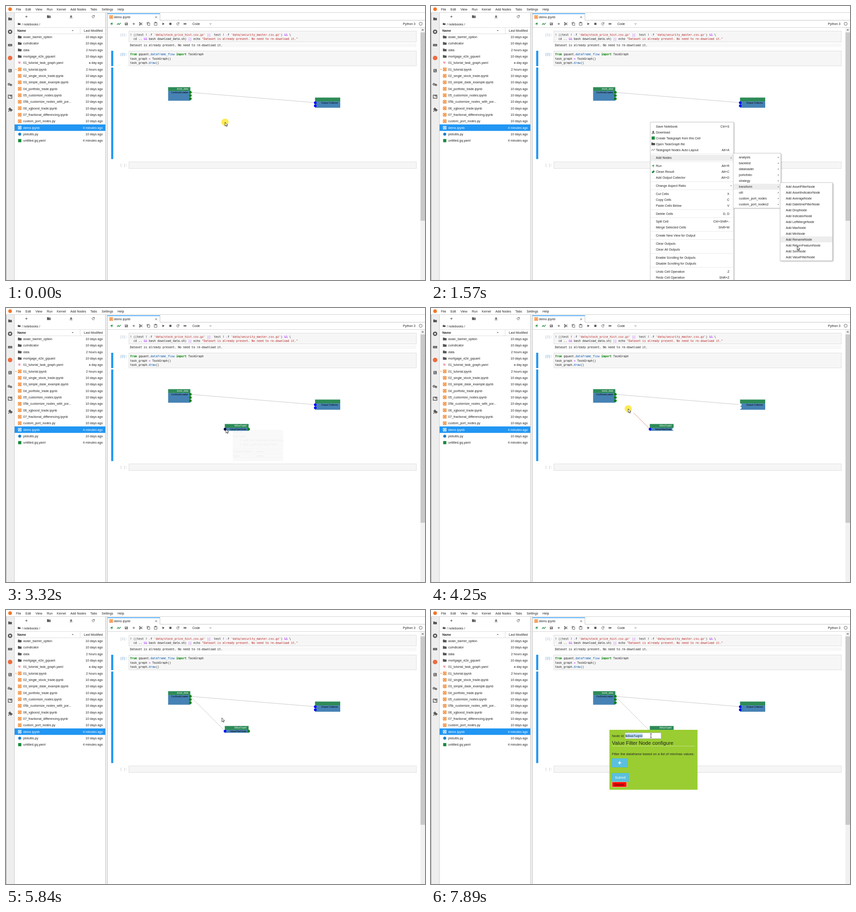
Write an HTML page with a canvas that moves like this. It is 924 by 606 pixels and loops after 8000 ms.

```html
<!DOCTYPE html>
<html lang="en">
<head>
<meta charset="utf-8">
<title>Notebook</title>
<style>
html, body { margin: 0; width: 100%; height: 100%; overflow: hidden; background: #fff; }
canvas { display: block; }
</style>
</head>
<body>
<canvas id="stage" width="924" height="606"></canvas>
<script>
const ctx = document.getElementById('stage').getContext('2d');
const LOOP = 8000;
const SANS = '"Liberation Sans", Arial, sans-serif';
const MONO = '"DejaVu Sans Mono", monospace';
const CHAR = 3.777;
const BLUE = '#2196f3', ORANGE = '#ef6c00', GREY = '#555', GREEN = '#1b8a3c';

// ---- drawing helpers ----
function text(str, x, y, { size = 7, color = '#222', align = 'left', font = SANS, bold = false } = {}) {
  ctx.save();
  ctx.translate(x, y + size * 0.36);
  ctx.scale(0.1, 0.1); // large font scaled down keeps fractional advances
  ctx.font = `${bold ? 'bold ' : ''}${size * 10}px ${font}`;
  ctx.textAlign = align;
  ctx.fillStyle = color;
  ctx.fillText(str, 0, 0);
  ctx.restore();
}

function box(x0, y0, x1, y1, fill, stroke) {
  if (fill) {
    ctx.fillStyle = fill;
    ctx.fillRect(x0, y0, x1 - x0, y1 - y0);
  }
  if (stroke) {
    ctx.strokeStyle = stroke;
    ctx.lineWidth = 0.8;
    ctx.strokeRect(x0, y0, x1 - x0, y1 - y0);
  }
}

function line(x0, y0, x1, y1, color, width = 1) {
  ctx.strokeStyle = color;
  ctx.lineWidth = width;
  ctx.beginPath();
  ctx.moveTo(x0, y0);
  ctx.lineTo(x1, y1);
  ctx.stroke();
}

function dot(x, y, r, color) {
  ctx.fillStyle = color;
  ctx.beginPath();
  ctx.arc(x, y, r, 0, 7);
  ctx.fill();
}

// Icon paths are centred on the origin.
function icon(d, x, y, { fill, stroke, width = 1 } = {}) {
  const path = new Path2D(d);
  ctx.save();
  ctx.translate(x, y);
  if (fill) { ctx.fillStyle = fill; ctx.fill(path, 'evenodd'); }
  if (stroke) { ctx.strokeStyle = stroke; ctx.lineWidth = width; ctx.stroke(path); }
  ctx.restore();
}

const ICON = {
  folder: 'M-4-3H-1L0-2H4V3H-4Z',
  plus: 'M-2.5 0H2.5M0-2.5V2.5',
  upload: 'M0-3L3 0H1V1.5H-1V0H-3ZM-3 2.2H3V3.2H-3Z',
  refresh: 'M2.3-1.2A2.6 2.6 0 1 0 2.5 .8M2.6-3V-.9H.5',
  runner: 'M-2.5 1L0-1L2-2.5M0-1L1 1L0 3M-2-1L0-1.5L2 .2',
  chart: 'M-4 2L-1.5-1L.5 1.5L4-2',
  save: 'M-3-3H2L3-2V3H-3ZM-2-2.2V-.6H1.2V-2.2ZM0 .3A1 1 0 1 0 .01 .3Z',
  cut: 'M-3-2.5L3 2.5M-3 2.5L3-2.5',
  copy: 'M-3 1.5V-3.5H1.5M-1.5-2H3V3.5H-1.5Z',
  paste: 'M-3-2.5H3V3.5H-3ZM-1.2-3.5H1.2V-1.5H-1.2Z',
  play: 'M-2-2.7L2.5 0L-2 2.7Z',
  forward: 'M-3.2-2.4L0 0V-2.4L3.2 0L0 2.4V0L-3.2 2.4Z',
  chevron: 'M-2-1L0 1L2-1',
  close: 'M-2-2L2 2M-2 2L2-2',
  caretUp: 'M-2 1L0-1L2 1Z',
  caretRight: 'M-1-1.4L1 0L-1 1.4Z',
  download: 'M-1-3H1V-.5H3L0 2L-3-.5H-1ZM-3.5 2.2H3.5V3.4H-3.5Z',
  eraser: 'M-3.5 1L.5-3L3.5-1L0 2.8H-2Z',
  gear: 'M-2.5-1A2 2 0 1 0-2.4-1ZM2 1A1.6 1.6 0 1 0 2.1 1Z',
  book: 'M-3.5-3.5H3.5V3.5H-3.5ZM-2-2V-.5H1V-2ZM-2 1V2H2V1Z',
  frame: 'M-4-3.5H4V3.5H-4ZM0-3.5V-1.2H4',
  puzzle: 'M-4-2H-1.6A1.5 1.5 0 1 1 .8-2H3V0A1.5 1.5 0 1 1 3 2.3V4.5H.8A1.4 1.4 0 1 0-1.5 4.5H-4V2.4A1.4 1.4 0 1 0-4 0Z',
  arrow: 'M0 0V8.6L2 6.8L3.4 9.7L4.7 9.1L3.4 6.3H6.1Z',
  beam: 'M-2-4.5Q0-4.5 0-3.5V3.5Q0 4.5-2 4.5M2-4.5Q0-4.5 0-3.5M0 3.5Q0 4.5 2 4.5'
};

// ---- application frame ----
const MENUS = { File: 22, Edit: 43, View: 65, Run: 90, Kernel: 112, 'Add Nodes': 142, Tabs: 186, Settings: 211, Help: 246 };
const FILES = `asian_barrier_option|cuIndicator|data|mortgage_e2e_gquant|01_tutorial_task_graph.yaml|01_tutorial.ipynb
02_single_stock_trade.ipynb|03_simple_dask_example.ipynb|04_portfolio_trade.ipynb|05_customize_nodes.ipynb
05b_customize_nodes_with_por...|06_xgboost_trade.ipynb|07_fractional_differencing.ipynb|custom_port_nodes.py
demo.ipynb|plotutils.py|untitled.gq.yaml`.split(/[|\n]/);
const AGES = { 2: '2 hours ago', 4: 'a day ago', 5: '2 hours ago', 14: '4 minutes ago', 16: '4 minutes ago' };

function notebookIcon(x, y, color, back) {
  box(x - 3.7, y - 3.7, x + 3.7, y + 3.7, color);
  box(x - 2.4, y - 2.5, x + 2.6, y + 2.4, back);
  box(x - 1.4, y - 1.5, x + 1.6, y + 1.5, color);
}

function fileIcon(name, x, y, selected) {
  if (/ipynb|_por/.test(name)) notebookIcon(x, y, selected ? '#fff' : ORANGE, selected ? BLUE : '#fff');
  else if (name.endsWith('.py')) dot(x, y, 3.3, '#1e7fc4');
  else if (name.endsWith('.gq.yaml')) box(x - 3.5, y - 3.5, x + 3.5, y + 3.5, GREEN);
  else if (name.endsWith('.yaml')) text('Y:', x - 3.5, y, { color: '#d32f4f', bold: true });
  else icon(ICON.folder, x, y, { fill: GREY });
}

function drawSidebar() {
  box(0, 0, 924, 14, '#fff');
  line(0, 14.5, 924, 14.5, '#d0d0d0');
  dot(9, 7, 4, '#f37726');
  for (const name in MENUS) text(name, MENUS[name], 7.5);

  box(0, 15, 18, 606, '#eee');
  line(0.5, 15, 0.5, 606, '#aaa');
  line(18.5, 15, 18.5, 606, '#ccc');
  icon(ICON.folder, 9, 28.5, { fill: GREY });
  dot(9, 57, 4.8, GREY);
  box(7.2, 55.2, 10.8, 58.8, '#eee');
  box(4.5, 84, 13.5, 89, GREY);
  line(6, 86.5, 12, 86.5, '#eee', 0.8);
  dot(9, 115, 5, '#ee6c40');
  icon(ICON.book, 9, 143, { fill: GREY });
  icon(ICON.gear, 9, 172, { stroke: GREY, width: 1.6 });
  icon(ICON.frame, 9, 200.5, { stroke: GREY, width: 1.4 });
  icon(ICON.puzzle, 9, 229, { fill: GREY });

  icon(ICON.plus, 45, 23.5, { stroke: GREY });
  icon(ICON.folder, 94.5, 23.5, { fill: GREY });
  line(94.5, 24, 97.5, 24, '#fff', 0.8);
  icon(ICON.upload, 143.5, 23.5, { fill: GREY });
  icon(ICON.refresh, 192.5, 23.5, { stroke: GREY });
  icon('M-3-2.2H-1L0-1.4H3V2.4H-3Z', 29, 39.7, { fill: GREY });
  text('/ notebooks /', 35, 40);
  line(19, 47.5, 220, 47.5, '#ddd');
  line(19, 61.5, 220, 61.5, '#ddd');
  text('Name', 25, 54.5, { bold: true });
  icon(ICON.caretUp, 147, 54, { fill: GREY });
  line(163.5, 48, 163.5, 61, '#ddd');
  text('Last Modified', 213.5, 54.5, { align: 'right' });

  FILES.forEach((name, i) => {
    const y = 68.5 + i * 14.33, selected = name === 'demo.ipynb';
    const color = selected ? '#fff' : '#222';
    if (selected) box(19, y - 7.2, 220, y + 7.1, BLUE);
    fileIcon(name, 30.3, y, selected);
    text(name, 38, y, { color });
    text(AGES[i] || '10 days ago', 213.5, y, { color, align: 'right' });
  });
  dot(22, 140.2, 1, ORANGE);

  box(220, 15, 224, 606, '#f2f2f2');
  line(219.5, 15, 219.5, 606, '#c4c4c4');
  line(223.5, 15, 223.5, 606, '#bbb');
}

function drawToolbar() {
  box(224, 15, 924, 31.5, '#fff');
  line(224, 31.5, 924, 31.5, '#c4c4c4');
  box(224, 16.5, 339.5, 32, '#fff');
  line(224, 17, 340, 17, BLUE, 1.4);
  line(339.5, 17, 339.5, 31.5, '#c4c4c4');
  notebookIcon(232, 24.3, ORANGE, '#fff');
  text('demo.ipynb', 238, 24.5);
  icon(ICON.close, 331, 24.7, { stroke: GREY, width: 0.9 });

  icon(ICON.runner, 233, 39.5, { stroke: GREEN, width: 1.1 });
  icon(ICON.chart, 249, 39.5, { stroke: GREEN, width: 1.3 });
  icon(ICON.save, 265.3, 39.5, { fill: GREY });
  icon(ICON.plus, 281.8, 39.5, { stroke: GREY });
  icon(ICON.cut, 297.5, 39.5, { stroke: GREY, width: 1.1 });
  dot(295, 41.7, 1.4, GREY);
  dot(295, 37.3, 1.4, GREY);
  icon(ICON.copy, 314, 39.5, { stroke: GREY, width: 0.9 });
  icon(ICON.paste, 330, 39.2, { stroke: GREY, width: 0.9 });
  icon(ICON.play, 347, 39.5, { fill: GREY });
  box(360.2, 37.2, 364.8, 41.8, GREY);
  icon(ICON.refresh, 379, 39.5, { stroke: GREY });
  icon(ICON.forward, 395.2, 39.5, { fill: GREY });
  text('Code', 411, 39.5);
  icon(ICON.chevron, 451, 39.5, { stroke: GREY });
  text('Python 3', 903, 39.5, { align: 'right' });
  ctx.beginPath();
  ctx.arc(914.5, 39.3, 3.4, 0, 7);
  ctx.strokeStyle = GREY;
  ctx.lineWidth = 0.9;
  ctx.stroke();
  line(224, 47.5, 924, 47.5, '#d4d4d4');

  box(914, 48, 924, 606, '#f1f1f1');
  box(914, 58.5, 924, 475, '#c9c9c9');
  icon('M-2 1L0-1L2 1', 919, 53, { stroke: GREY, width: 1.1 });
}

// ---- notebook cells ----
const TOKEN = {
  k: { color: '#008000', bold: true }, s: { color: '#ba2121' },
  o: { color: '#a2f' }, p: { color: '#05a' }, n: { color: '#212121' }
};

// Segments look like "k:from"; each one carries a token type.
function code(x, y, ...parts) {
  for (const part of parts) {
    const str = part.slice(2);
    text(str, x, y, { size: 6.27, font: MONO, ...TOKEN[part[0]] });
    x += str.length * CHAR;
  }
}

function prompt(label, y, color) {
  text(label, 252, y, { size: 6.27, font: MONO, color });
}

function drawCells() {
  box(271, 55.5, 905, 79.5, '#f6f6f6', '#d8d8d8');
  prompt('[1]:', 63.3, '#8aa2b8');
  code(273.5, 63.3, 'n:! ((test ! ', 'o:-', 'n:f ', "s:'data/stock_price_hist.csv.gz'", 'o: ||', 'n:  test ! ', 'o:-', 'n:f ',
    "s:'data/security_master.csv.gz'", 'n:) ', 'o:&&', 'n: \\');
  code(273.5, 72.5, 'n:  cd .. ', 'o:&&', 'n: bash download_data.sh) ', 'o:||', 'n: echo ',
    's:"Dataset is already present. No need to re-download it."');
  box(271, 82.5, 905, 91, '#f8f8f8');
  code(273.5, 87, 'n:Dataset is already present. No need to re-download it.');

  box(232, 99, 236.5, 133, BLUE);
  box(232, 136, 236.5, 338.5, BLUE);
  box(271, 99.5, 905, 132.3, '#f6f6f6', '#d8d8d8');
  prompt('[2]:', 107, '#307fc1');
  code(273.5, 107, 'k:from', 'n: gquant.', 'p:dataframe_flow', 'n: ', 'k:import', 'n: TaskGraph');
  code(273.5, 116.3, 'n:task_graph ', 'o:=', 'n: TaskGraph()');
  code(273.5, 125.6, 'n:task_graph.', 'p:draw', 'n:()');

  box(271, 344.8, 905, 359.3, '#f6f6f6', '#d8d8d8');
  prompt('[ ]:', 352, '#a8a8a8');
}

// ---- task graph ----
function node(x0, x1, y0, y1, name, type) {
  box(x0, y0, x1, y0 + 8.6, '#2e8b57');
  box(x0, y0 + 8.6, x1, y1, '#4682b4');
  text(name, x1 - 4.8, y0 + 4, { size: 5.15, color: '#fff', align: 'right' });
  text(type, x1 - 4.8, y0 + 11.9, { size: 5.1, color: '#000', align: 'right' });
}

function drawGraph(t) {
  const added = t >= 2440, dragging = t >= 3860 && t < 5600;
  const over = t >= 3000 && t < 3860;
  line(406.5, 191, 681.5, 213.7, '#c8c8c8');
  if (t >= 5600) line(406.5, 191, 483, 268, '#c8c8c8');
  if (dragging) {
    const end = pointer(t - 80);
    line(483, 268, end.x, end.y, '#e08078', 0.9);
  }
  node(357.5, 406.5, 179.5, 209.5, 'stock_data', 'CsvStockLoader');
  node(681.5, 737, 202.5, 225, '', 'Output Collector');
  for (const y of [191, 198, 205]) dot(406.5, y, 2.9, '#008000');
  for (const y of [214, 220.7]) dot(682, y, 2.9, dragging ? '#fff' : '#00f');
  if (added) {
    node(482.5, 535, 256.5, 271.6, 'lk8xa7uqml', 'ValueFilterNode');
    dot(483, 268, 2.9, over ? '#00003a' : '#00f');
    dot(535, 268, 2.9, dragging ? '#fff' : '#008000');
  }
}

function tooltip(x, y, w, h, alpha, port, types, columns) {
  if (alpha <= 0) return;
  const style = { size: 6.4, color: '#000' };
  const bold = { size: 6.25, color: '#000', bold: true };
  ctx.save();
  ctx.globalAlpha = alpha;
  box(x, y, x + w, y + h, '#808080');
  text('Port: ' + port, x, y + 5, style);
  text('Port Type:', x, y + 14, style);
  types.forEach((type, i) => {
    const row = y + 23 + i * 9;
    dot(x + 17, row, 1.1, '#000');
    text(type, x + 22, row, style);
  });
  const top = y + 38 + (types.length - 1) * 9;
  for (const dy of [-5, 5, 14]) line(x, top + dy, x + w, top + dy, '#555', 0.5);
  text('Column Name', x + 1, top, bold);
  text('Type', x + 1, top + 10, bold);
  for (const [cx, name, type] of columns) {
    text(name, x + cx, top, { ...bold, align: 'center' });
    text(type, x + cx, top + 10, { ...bold, align: 'center' });
  }
  ctx.restore();
}

const ramp = (t, a, b) => Math.min(1, Math.max(0, (t - a) / (b - a)));

function drawTooltips(t) {
  if (t < 3860) {
    tooltip(500, 269.5, 111, 69, 0.8 * ramp(t, 3300, 3630), 'in',
      ['cudf.core.dataframe.DataFrame', 'dask_cudf.core.DataFrame'], [[60, 'asset', 'int64']]);
  }
  tooltip(423, 193, 194, 52.5, 0.8 * ramp(t, 4810, 5290) * (1 - ramp(t, 5520, 5680)), 'cudf_out',
    ['cudf.core.dataframe.DataFrame'],
    [[58, 'datetime', ''], [51, '', 'data'], [81, 'asset', 'int64'], [101, 'volume', 'float64'], [122, 'close', 'float64'],
      [141, 'open', 'float64'], [161, 'high', 'float64'], [182, 'low', 'float64']]);
}

// ---- context menus ----
const GROUPS = [
  'Save Notebook|Ctrl+S;Download;Create Taskgraph from this Cell;Open TaskGraph file;Taskgraph Nodes Auto Layout|Alt+A',
  'Add Nodes|>', 'Run|Alt+R;Clean Result|Alt+C;Add Output Collector|Alt+O', 'Change Aspect Ratio|>',
  'Cut Cells|X;Copy Cells|C;Paste Cells Below|V', 'Delete Cells|D, D', 'Split Cell|Ctrl+Shift+-;Merge Selected Cells|Shift+M',
  'Create New View for Output', 'Clear Outputs;Clear All Outputs',
  'Enable Scrolling for Outputs;Disable Scrolling for Outputs', 'Undo Cell Operation|Z;Redo Cell Operation|Shift+Z'
];
const KINDS = 'analysis backtest dataloader portofolio strategy transform util custom_port_nodes custom_port_nodes2'.split(' ');
const NODES = 'AssetFilter AssetIndicator Average DatetimeFilter Drop Indicator LeftMerge Max Min Rename ReturnFeature Sort ValueFilter'.split(' ');

const mainItems = [], rules = [];
let rowY = 266;
for (const group of GROUPS) {
  for (const item of group.split(';')) {
    const [label, key] = item.split('|');
    mainItems.push({ label, key, y: rowY });
    rowY += 13;
  }
  rules.push(rowY - 4.1);
  rowY += 4.8;
}
const kindItems = KINDS.map((label, i) => ({ label, key: '>', y: 334.8 + 13 * i }));
const nodeItems = NODES.map((name, i) => ({ label: `Add ${name}Node`, y: 399.3 + 12.98 * i }));

const itemAt = (items, y) => items.find(item => Math.abs(item.y - y) <= 6.5);

function menu(x0, y0, x1, y1, items, active) {
  ctx.save();
  ctx.shadowColor = 'rgba(0,0,0,.35)';
  ctx.shadowBlur = 3;
  ctx.shadowOffsetX = ctx.shadowOffsetY = 1;
  box(x0, y0, x1, y1, '#fff');
  ctx.restore();
  box(x0, y0, x1, y1, null, '#b8b8b8');
  for (const item of items) {
    if (item === active) box(x0 + 0.5, item.y - 6.5, x1 - 0.5, item.y + 6.5, '#ededed');
    text(item.label, x0 + 12.5, item.y);
    if (item.key === '>') icon(ICON.caretRight, x1 - 5.5, item.y, { fill: GREY });
    else if (item.key) text(item.key, x1 - 9.5, item.y, { align: 'right' });
  }
}

function drawMenus(t) {
  if (t < 80 || t >= 2440) return;
  const p = pointer(t - 80);
  const addNodes = mainItems.find(item => item.label === 'Add Nodes');
  const transform = kindItems[KINDS.indexOf('transform')];
  menu(483.5, 257, 667.5, 615, mainItems, p.x > 667 || t >= 780 ? addNodes : itemAt(mainItems, p.y));
  for (const y of rules) line(484, y, 667, y, '#e2e2e2', 0.8);
  icon(ICON.download, 490, 279, { fill: GREY });
  box(486.5, 288.5, 493.5, 295.5, GREEN);
  icon(ICON.folder, 490, 305, { fill: GREY });
  icon(ICON.chart, 490, 318, { stroke: GREY });
  icon(ICON.runner, 490, 353.6, { stroke: GREEN });
  icon(ICON.eraser, 490, 366.6, { fill: GREEN });
  if (t >= 1010) menu(666.5, 325.5, 771.5, 447, kindItems, p.x > 770 ? transform : p.x > 667 ? itemAt(kindItems, p.y) : null);
  if (t >= 1330) menu(770, 390.7, 885.5, 563.5, nodeItems, p.x > 770 ? itemAt(nodeItems, p.y) : null);
}

// ---- node settings ----
function drawPanel(t) {
  if (t < 6790) return;
  box(393.5, 265, 587.7, 397.5, '#9acd32');
  text('Node id:', 399, 278, { size: 7.4 });
  box(428, 271.5, 507.5, 284.5, '#fff', '#aaa');
  if (t >= 7890) box(428.5, 273.5, 466.5, 282.5, '#b3d7ff');
  text('lk8xa7uqml', 428.7, 278, { size: 7.4 });
  text('Value Filter Node configure', 399, 293.5, { size: 11.25 });
  line(399, 301, 582, 301, '#d6e8a8', 0.8);
  text('Filter the dataframe based on a list of min/max values.', 399, 318, { size: 7.58 });
  box(399, 328.5, 433.3, 347.7, '#5bc0de', '#46b8da');
  icon('M-3.5 0H3.5M0-3.5V3.5', 416, 338, { stroke: '#fff', width: 1.6 });
  box(399, 361, 436, 379.5, '#5bc0de', '#46b8da');
  text('Submit', 417.5, 370.2, { size: 7.55, color: '#fff', align: 'center' });
  box(399.5, 380.2, 431.2, 391.6, '#f00', '#e8d0c0');
  text('Delete', 415.3, 386, { size: 7.4, align: 'center' });
}

// ---- pointer ----
const PATH = [
  [0, 483, 257], [390, 483, 257], [780, 547, 338], [930, 547, 338], [1010, 580, 337], [1090, 645, 337],
  [1170, 692, 350], [1250, 712, 398], [1330, 765, 400], [1410, 790, 440], [1490, 800, 515], [1570, 807.5, 531],
  [1810, 805, 546], [2130, 803, 552], [2360, 803, 552], [2840, 533, 268], [2920, 533, 268], [3080, 485, 268],
  [3780, 485, 268], [4170, 447, 232], [4250, 435, 223], [4650, 408, 191.5], [5520, 408, 191.5],
  [5840, 476, 238.5], [6400, 497, 268], [7090, 497, 268], [7330, 470, 276], [7570, 485, 278], [LOOP, 485, 278]
];
const PRESSES = [[0, 160], [2290, 2440], [3860, 5600], [6710, 6870]];

function pointer(t) {
  const i = Math.max(1, PATH.findIndex(key => key[0] > t));
  const [t0, x0, y0] = PATH[i - 1], [t1, x1, y1] = PATH[i];
  const k = ramp(t, t0, t1);
  return { x: x0 + (x1 - x0) * k, y: y0 + (y1 - y0) * k };
}

function drawPointer(t) {
  const { x, y } = pointer(t);
  if (PRESSES.some(([a, b]) => t >= a && t < b)) dot(x, y, 8, 'rgba(253,228,30,.75)');
  const typing = t > 7090 && y > 272;
  if (typing) icon(ICON.beam, x, y, { stroke: '#222', width: 0.9 });
  else icon(ICON.arrow, x, y, { fill: '#fff', stroke: '#111', width: 0.8 });
}

function render(t) {
  box(0, 0, 924, 606, '#fff');
  drawSidebar();
  drawToolbar();
  drawCells();
  drawGraph(t);
  drawTooltips(t);
  drawMenus(t);
  drawPanel(t);
  drawPointer(t);
}

const start = performance.now();
function tick() {
  render((performance.now() - start) % LOOP);
  requestAnimationFrame(tick);
}
tick();
</script>
</body>
</html>
```
